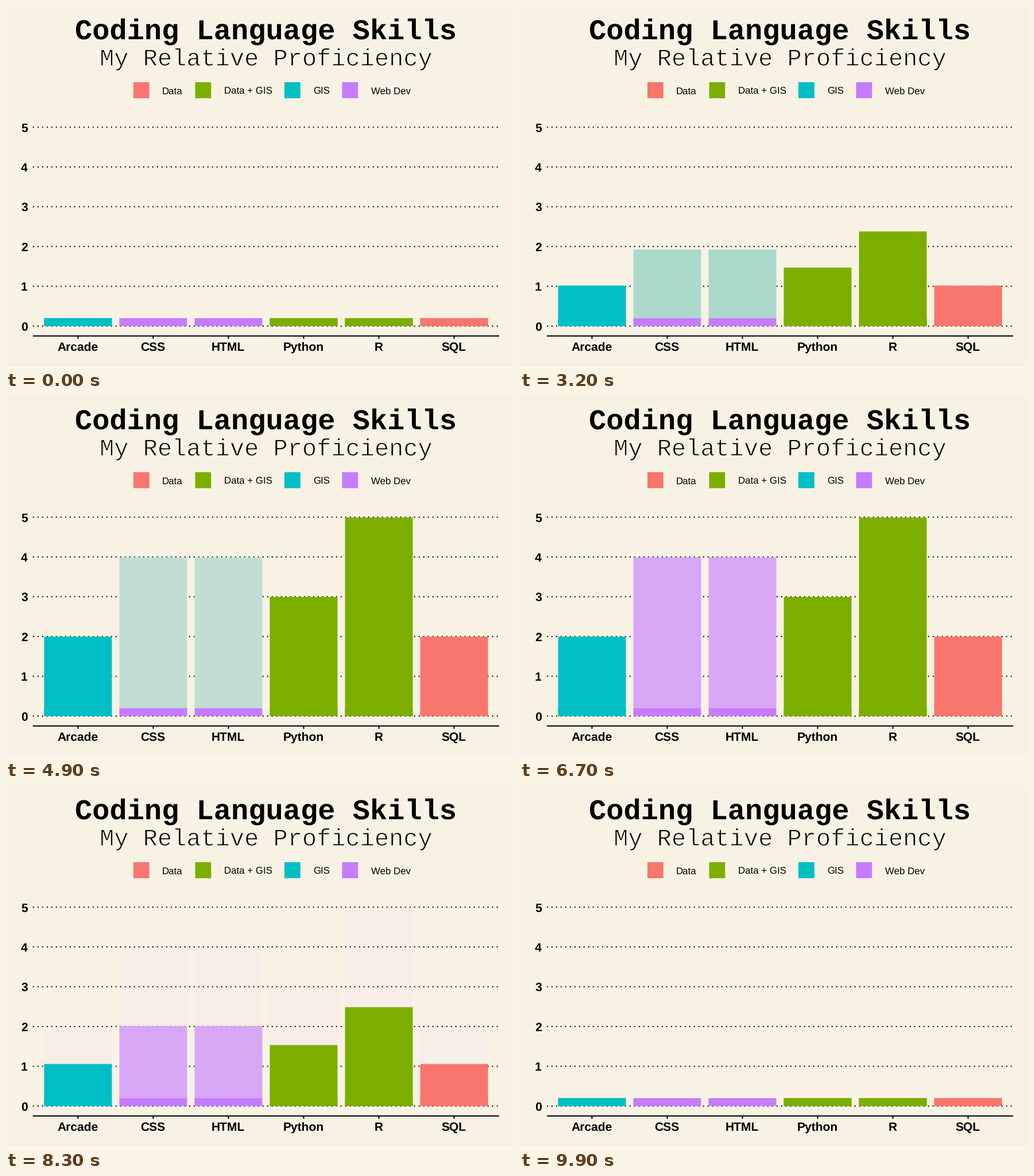
Write a matplotlib script that moves like this. It is 885 px wide and 632 px high and loops after 10 s.

```python
import numpy as np
import matplotlib.pyplot as plt
from matplotlib import patheffects
from matplotlib.animation import FuncAnimation
from matplotlib.colors import to_rgb
from matplotlib.patches import Rectangle

W, H, DPI = 885, 632, 64
PX = 72 / DPI  # points per pixel
PAPER = "#f8f2e4"
RED, GREEN, TEAL, PURPLE = "#f8766d", "#7cae00", "#00bfc4", "#c77cff"

LEFT, RIGHT, AXIS_Y = 46.8, 859.2, 576.1
ZERO_Y, UNIT = 558.8, 69.46
FIRST_X, STEP = 125.4, 131.05
BAR_W = 0.9 * STEP
LOW = 0.2

SKILLS = [("Arcade", 2, TEAL), ("CSS", 4, PURPLE), ("HTML", 4, PURPLE),
          ("Python", 3, GREEN), ("R", 5, GREEN), ("SQL", 2, RED)]
LEGEND = [("Data", RED, 222, 272), ("Data + GIS", GREEN, 329.5, 380),
          ("GIS", TEAL, 485, 535), ("Web Dev", PURPLE, 585.5, 636)]

plt.rcParams["path.snap"] = False
plt.rcParams["text.hinting"] = "none"
plt.rcParams["toolbar"] = "None"

fig = plt.figure(figsize=(W / DPI, H / DPI), dpi=DPI, facecolor=PAPER)
ax = fig.add_axes([0, 0, 1, 1])
ax.set(xlim=(0, W), ylim=(H, 0))
ax.axis("off")


def rect(x, y, w, h, color, z=3):
    return ax.add_patch(Rectangle((x, y), w, h, fc=color, lw=0, zorder=z, snap=False))


def label(x, y, text, size, family="Liberation Sans", weight="normal", ha="center"):
    return ax.text(x, y, text, size=size * PX, family=family, weight=weight,
                   ha=ha, va="baseline", color="black", zorder=5)


def line(xs, ys, style="-"):
    ax.plot(xs, ys, color="black", lw=2 * PX, ls=style, zorder=2,
            solid_capstyle="butt", dash_capstyle="butt")


def value_y(value):
    return ZERO_Y - UNIT * value


def set_span(bar, low, high):
    bar.set_y(value_y(high))
    bar.set_height(UNIT * max(high - low, 0))


def blend(frame, times, colors):
    channels = zip(*(to_rgb(c) for c in colors))
    return [float(np.interp(frame, times, c)) for c in channels]


def growth(frame):
    """Share of the full rise, eased with a sine in both directions."""
    if frame <= 50:
        p = np.clip((frame - 16) / 34, 0, 1)
    else:
        p = 1 - np.clip((frame - 66) / 33, 0, 1)
    return 0.5 - 0.5 * np.cos(np.pi * p)


def web_color(frame):
    if frame >= 50:
        return "#d8a7f6"
    return blend(frame, [17, 32, 43], ["#b48ce8", "#abdacd", "#c1ddd4"])


def ghost_color(frame):
    return blend(frame, [66, 83, 99], ["#f5ede6", "#f5ede6", "#f7f0e4"])


# Headings and legend
center = (LEFT + RIGHT) / 2
label(center, 57.3, "Coding Language Skills", 50.4, "Liberation Mono", "bold")
subtitle = label(center, 104, "My Relative Proficiency", 42, "Liberation Mono")
subtitle.set_path_effects([
    patheffects.Normal(),
    patheffects.Stroke(linewidth=1.1 * PX, foreground=PAPER),
])
for name, color, box_x, text_x in LEGEND:
    rect(box_x, 133, 27.8, 28, color)
    label(text_x, 154, name, 16.9, ha="left")

# Axes
for value in range(6):
    y = value_y(value)
    line([LEFT, RIGHT], [y, y], (0, (1, 3)))
    label(37.8, y + 7.8, str(value), 21, weight="bold", ha="right")
line([LEFT, RIGHT], [AXIS_Y, AXIS_Y])
rect(0, H - 1, W, 1, "white")

# Bars
bars, ghosts = [], []
for i, (name, level, color) in enumerate(SKILLS):
    x = FIRST_X + i * STEP
    line([x, x], [AXIS_Y, AXIS_Y + 5])
    label(x - 0.5, 602, name, 21, weight="bold")
    ghosts.append(rect(x - BAR_W / 2, ZERO_Y, BAR_W, 0, PAPER, z=1))
    base = rect(x - BAR_W / 2, ZERO_Y, BAR_W, 0, color)
    set_span(base, 0, LOW)
    bars.append(rect(x - BAR_W / 2, ZERO_Y, BAR_W, 0, color))


def draw(frame):
    share = growth(frame)
    for (_, level, color), bar, ghost in zip(SKILLS, bars, ghosts):
        top = LOW + (level - LOW) * share
        is_web = color == PURPLE
        set_span(bar, LOW if is_web else 0, top)
        if is_web:
            bar.set_facecolor(web_color(frame))
        set_span(ghost, top, level)
        ghost.set_facecolor(ghost_color(frame))
        ghost.set_visible(frame > 66)
    return bars + ghosts


anim = FuncAnimation(fig, draw, frames=100, interval=100, repeat=True, repeat_delay=0)
plt.show()
```
